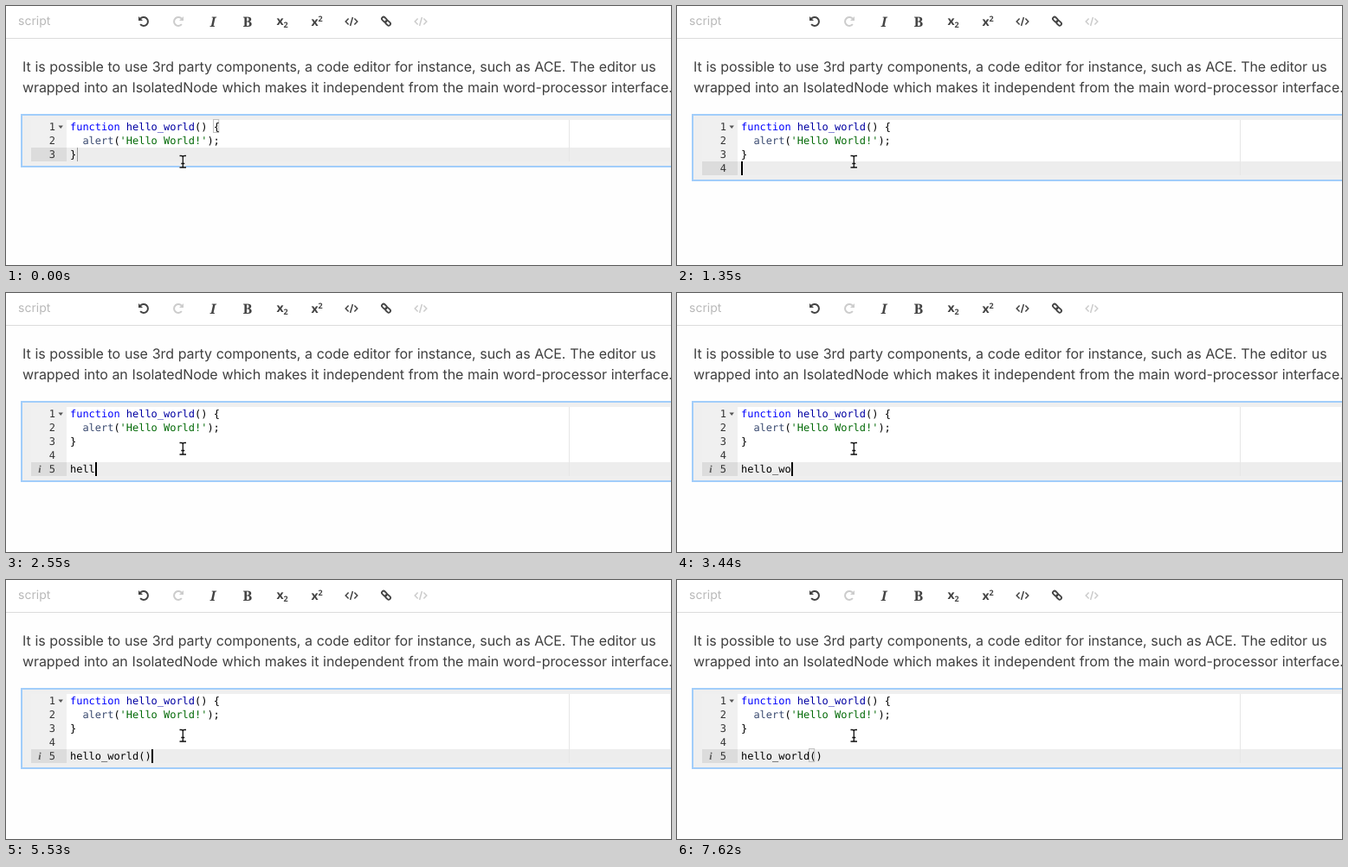
These frames come from a looping animation (768x300 px, 8000 ms). An HTML page:

```html
<!DOCTYPE html>
<html lang="en">
<head>
<meta charset="utf-8">
<title>Code editor component</title>
<style>
  html, body { margin: 0; width: 100%; height: 100%; overflow: hidden; background: #fefefe; }
  svg { display: block; }
  text { white-space: pre; text-rendering: geometricPrecision; }
  .prose { font: 16px Inter, "Open Sans", sans-serif; letter-spacing: -.09px; word-spacing: .4px; fill: #3f3f3f; }
  .label { font: 14px Inter, "Open Sans", sans-serif; fill: #b9b9b9; }
  .code, .num { font: 12px "DejaVu Sans Mono", monospace; letter-spacing: -.024px; }
  .num { fill: #333; text-anchor: end; }
  .key { fill: #00f; }
  .name { fill: #0000a2; }
  .call { fill: #3c4c72; }
  .str { fill: #036a07; }
  .serif { font: bold 16px "Noto Serif", serif; text-anchor: middle; }
  .italic { font-style: italic; }
  .sans { font: bold 14px "Open Sans", sans-serif; }
  .small { font-size: 9px; }
  .hint { font: italic bold 12px "Liberation Serif", serif; fill: #555; text-anchor: middle; }
  .tool { fill: #444; color: #444; }
  .off { fill: #ccc; color: #ccc; }
  .line { fill: none; stroke: currentColor; }
</style>
</head>
<body>
<svg width="768" height="300" viewBox="0 0 768 300">
  <defs>
    <g id="turn">
      <path class="line" stroke-width="2" d="M-4.2-2.8A5 5 0 1 1-3.9 3.2"/>
      <path d="M-6-6V-1H-1Z"/>
    </g>
    <path id="tag" class="line" stroke-width="1.5" d="M-3.4-3.6L-6.8 0L-3.4 3.6M3.4-3.6L6.8 0L3.4 3.6M1.4-5L-1.4 5"/>
    <path id="beam" fill="none" d="M200.5 173.5h2q1.8 0 1.8 1.6v10.3q0 1.6-1.8 1.6h-2M208 173.5h-2q-1.7 0-1.7 1.6v10.3q0 1.6 1.7 1.6h2M202.3 182.5h4"/>
  </defs>

  <rect width="768" height="37" fill="#fff"/>
  <rect y="37" width="768" height="1" fill="#dcdcdc"/>
  <text class="label" x="14" y="22">script</text>
  <g class="tool">
    <use href="#turn" x="159" y="18"/>
    <use class="off" href="#turn" transform="translate(199 18) scale(-1 1)"/>
    <text class="serif italic" x="239" y="24">I</text>
    <text class="serif" x="279" y="24">B</text>
    <text class="sans" x="312.5" y="22">x<tspan class="small" dy="3">2</tspan></text>
    <text class="sans" x="352.5" y="23">x<tspan class="small" dy="-5">2</tspan></text>
    <use href="#tag" x="399" y="18"/>
    <g class="line" stroke-width="2" transform="translate(439 17.7) rotate(45) scale(.9)">
      <rect x="-6.9" y="-2.3" width="7.4" height="4.6" rx="2.2"/>
      <rect x="-.5" y="-2.3" width="7.4" height="4.6" rx="2.2"/>
    </g>
    <use class="off" href="#tag" x="479" y="18"/>
  </g>

  <text class="prose" x="19" y="76">It is possible to use 3rd party components, a code editor for instance, such as ACE. The editor us</text>
  <text class="prose" x="19" y="100">wrapped into an IsolatedNode which makes it independent from the main word-processor interface.</text>

  <rect id="frame" x="18" y="126" width="780" fill="#efefef" stroke="#a1cdfa" stroke-width="2"/>
  <rect id="page" x="70" y="132" width="697" fill="#fff"/>
  <rect id="gutter" x="29" y="132" width="41" fill="#f0f0f0"/>
  <rect id="active" x="70" width="697" height="16" fill="#ededed"/>
  <rect id="activeNum" x="29" width="41" height="16" fill="#dcdcdc"/>
  <rect id="margin" x="650" y="132" width="1" fill="#e6e6e6"/>
  <rect id="bracket" width="6.2" height="15" fill="none" stroke="#c0c0c0"/>
  <g id="nums"></g>
  <path d="M60.5 138.5h5.4l-2.7 3.4z" fill="#555"/>
  <text class="code" x="74" y="144"><tspan class="key">function</tspan> <tspan class="name">hello_world</tspan>() {</text>
  <text class="code" x="88.4" y="160"><tspan class="call">alert</tspan>(<tspan class="str">'Hello World!'</tspan>);</text>
  <text class="code" x="74" y="176">}</text>
  <text class="code" id="typed" x="74" y="208"></text>
  <text class="hint" id="info" x="39" y="208">i</text>
  <g id="error">
    <rect x="33.5" y="197.5" width="12" height="12" rx="2" fill="#e2522f" stroke="#b5371b"/>
    <path d="M36.7 200.7l5.6 5.6m0-5.6l-5.6 5.6" stroke="#fff" stroke-width="1.9"/>
  </g>
  <rect id="caret" height="16"/>
  <use href="#beam" stroke="#fff" stroke-width="2.8" opacity=".7"/>
  <use href="#beam" stroke="#111" stroke-width="1.3"/>
</svg>
<script>
const LOOP = 8000, TOP = 132, ROW = 16, LEFT = 74, CHAR = 7.2;
const $ = id => document.getElementById(id);
const set = (id, attrs) => {
  for (const k in attrs) $(id).setAttribute(k, attrs[k]);
};
const show = (id, on) => set(id, { visibility: on ? 'visible' : 'hidden' });

// Each step changes only the listed parts of the state; match is [column, row].
const steps = [];
let state = { rows: 3, text: '', col: 1, caret: 'faint', match: [23, 0], icon: '' };
const at = (time, change) => {
  state = { ...state, ...change };
  steps.push({ time, ...state });
};
const type = (time, word) => [...word].forEach((c, i) => {
  const text = state.text + c;
  at(time + i * 150, { text, col: text.length });
});

at(0, {});
at(750, { caret: 'on' });
at(1350, { rows: 4, col: 0, match: null });
at(1650, { rows: 5 });
type(2100, 'hell');
at(2550, { icon: 'info' });
type(2700, 'o');
type(3140, '_wo');
type(3730, 'rld');
at(4480, { text: 'hello_world()', col: 12, match: [12, 4] });
at(5080, { caret: 'off' });
at(5530, { caret: 'on', col: 13, match: null });
at(5680, { match: [11, 4] });
at(5980, { text: 'hello_world(', col: 12, match: null });
at(6420, { icon: 'error' });
at(6570, { text: 'hello_world', col: 11 });
at(6870, { text: 'hello_world()', col: 12, match: [12, 4] });
at(7020, { col: 13, match: null });
at(7170, { match: [11, 4] });
at(7620, { caret: 'off', icon: 'info' });

for (let i = 1; i <= 5; i++) {
  const num = document.createElementNS('http://www.w3.org/2000/svg', 'text');
  num.setAttribute('class', 'num');
  num.setAttribute('x', 57);
  num.setAttribute('y', TOP + i * ROW - 4);
  num.textContent = i;
  $('nums').append(num);
}

function draw(s) {
  const height = s.rows * ROW, y = TOP + height - ROW;
  set('frame', { height: height + 12 });
  for (const id of ['page', 'gutter', 'margin']) set(id, { height });
  for (const id of ['active', 'activeNum']) set(id, { y });
  [...$('nums').children].forEach((n, i) =>
    n.setAttribute('visibility', i < s.rows ? 'visible' : 'hidden'));
  $('typed').textContent = s.text;
  show('info', s.icon === 'info');
  show('error', s.icon === 'error');
  show('bracket', s.match);
  if (s.match) {
    const [col, row] = s.match;
    set('bracket', { x: Math.round(LEFT + col * CHAR - 1) + .5, y: TOP + row * ROW - .5 });
  }
  const x = Math.round(LEFT + s.col * CHAR), faint = s.caret === 'faint';
  show('caret', s.caret !== 'off');
  set('caret', { x: faint ? x + 1 : x, y, width: faint ? 1 : 2, fill: faint ? '#999' : '#000' });
}

let last;
function tick() {
  const t = performance.now() % LOOP;
  const step = steps.filter(s => s.time <= t).pop();
  if (step !== last) draw(last = step);
  requestAnimationFrame(tick);
}
tick();
</script>
</body>
</html>
```
